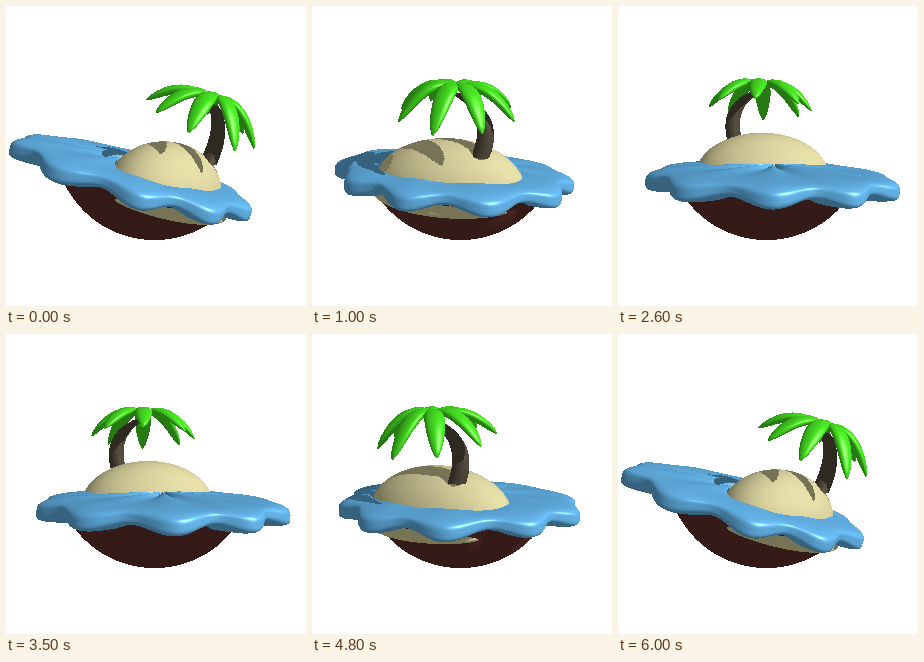
Animation of 300x300 px, one loop 6100 ms. Source, as an HTML page with a canvas:

```html
<!DOCTYPE html>
<html>
<head>
<meta charset="utf-8">
<style>
html, body { margin: 0; height: 100%; overflow: hidden; background: #fff; }
canvas { display: block; width: 300px; height: 300px; }
</style>
</head>
<body>
<canvas id="stage" width="300" height="300"></canvas>
<script>
const SIZE = 300, STEP = 100, LOOP = 6100, SWING = 6000, DISTANCE = 620;
const { PI, sin, cos, min, max, floor, ceil } = Math;
const rad = d => d * PI / 180;
const dot = (a, b) => a[0] * b[0] + a[1] * b[1] + a[2] * b[2];
const sub = (a, b) => a.map((x, i) => x - b[i]);
const cross = (a, b) => [a[1] * b[2] - a[2] * b[1], a[2] * b[0] - a[0] * b[2], a[0] * b[1] - a[1] * b[0]];
const unit = a => { const l = Math.hypot(...a) || 1; return a.map(x => x / l); };

const light = unit([.64, .47, .61]);
const lightX = unit(cross([0, 1, 0], light)), lightY = cross(light, lightX);
const halfway = unit([light[0], light[1], light[2] + 1]);

// A parametric surface sampled on a grid, with normals from differences.
function surface(cols, rows, color, gloss, f) {
  const verts = [], tris = [], e = 1e-3;
  for (let j = 0; j <= rows; j++) for (let i = 0; i <= cols; i++) {
    const u = i / cols, v = .005 + .99 * j / rows;
    const normal = unit(cross(sub(f(u + e, v), f(u - e, v)), sub(f(u, v + e), f(u, v - e))));
    verts.push({ point: f(u, v), normal });
    if (i < cols && j < rows) {
      const a = j * (cols + 1) + i, b = a + cols + 1;
      tris.push([a, a + 1, b], [a + 1, b + 1, b]);
    }
  }
  return { verts, tris, color, gloss };
}

// Starts at the pole of radius ry (negative for the top) and covers a share of the way to the other.
function ellipsoid([x, y, z], [rx, ry, rz], color, span = 1) {
  return surface(64, 28, color, 0, (u, v) => {
    const a = v * PI * span, t = u * 2 * PI;
    return [x + rx * sin(a) * cos(t), y - ry * cos(a), z + rz * sin(a) * sin(t)];
  });
}

const SAND = [229, 221, 167], BASE = [19, -6, 55], CROWN = [-7, 51, 54];

const water = surface(160, 24, [105, 188, 243], .35, (u, v) => {
  const t = u * 2 * PI, a = (v - .5) * PI, c = cos(a), lobe = cos(10 * t + .4 * sin(3 * t));
  const r = (117 + 6 * lobe + 3 * cos(3 * t + 1)) * (1 - (1 - c) ** 2);
  return [-5 + r * cos(t), -36 + (12 + 2 * lobe) * sin(a) - (2 + 3 * lobe) * c, -9 + r * sin(t)];
});

const trunk = surface(16, 14, [88, 80, 66], .25, (u, v) => {
  const a = u * 2 * PI, r = 8.5 - 2.5 * v, bend = 2 * v * (1 - v);
  return [BASE[0] + 14 * bend + (CROWN[0] - BASE[0]) * v * v + r * cos(a),
    BASE[1] + 40 * bend + (CROWN[1] - BASE[1]) * v * v,
    BASE[2] + r * sin(a)];
});

function leaf(degrees) {
  const c = cos(rad(degrees)), s = sin(rad(degrees)), front = cos(rad(degrees - 110));
  const length = 55 - 7 * front, droop = 26 + 12 * front;
  return surface(14, 16, [74, 232, 36], .4, (u, v) => {
    const a = u * 2 * PI, w = max(0, sin(PI * v ** 1.1)) ** .55;
    const side = 9 * w * cos(a), thick = 5 * w * sin(a);
    const out = length * v + thick * v;
    return [CROWN[0] + out * c - side * s,
      CROWN[1] + 4 + 24 * v - (droop + 24) * v * v + thick * (1 - v / 2),
      CROWN[2] + out * s + side * c];
  });
}

const parts = [
  ellipsoid([0, 0, 0], [99, 99, 99], [100, 52, 46], .363),
  ellipsoid([-8, -51, 24], [72, 12, 72], SAND),
  ellipsoid([-7, -40, 33], [72, -46, 47], SAND, .53),
  water, trunk,
  ...[15, 60, 110, 165, 205, 245, 290, 330].map(leaf)
];

function rotation(time) {
  const yaw = 116 * (.5 - cos(2 * PI * time / SWING));
  const pitch = rad(7.5 + 4 * cos(rad(1.5 * (yaw + 5))));
  const roll = rad(.00084 * (yaw - 90) ** 2 - 2.6);
  const cy = cos(rad(yaw)), sy = sin(rad(yaw)), cp = cos(pitch), sp = sin(pitch), cr = cos(roll), sr = sin(roll);
  return ([x, y, z]) => {
    const x1 = x * cy - z * sy, z1 = x * sy + z * cy, y1 = y * cp - z1 * sp;
    return [x1 * cr + y1 * sr, y1 * cr - x1 * sr, y * sp + z1 * cp];
  };
}

// Fills triangles into a depth buffer; put() gets each nearest pixel.
function raster(part, key, depth, put) {
  for (const tri of part.tris) {
    const [A, B, C] = tri.map(i => part.verts[i]);
    const a = A[key], b = B[key], c = C[key];
    const area = (b[0] - a[0]) * (c[1] - a[1]) - (c[0] - a[0]) * (b[1] - a[1]);
    if (!area) continue;
    const x0 = max(0, ceil(min(a[0], b[0], c[0]))), x1 = min(SIZE - 1, floor(max(a[0], b[0], c[0])));
    const y0 = max(0, ceil(min(a[1], b[1], c[1]))), y1 = min(SIZE - 1, floor(max(a[1], b[1], c[1])));
    for (let y = y0; y <= y1; y++) for (let x = x0; x <= x1; x++) {
      const q = ((x - a[0]) * (c[1] - a[1]) - (c[0] - a[0]) * (y - a[1])) / area;
      const r = ((b[0] - a[0]) * (y - a[1]) - (x - a[0]) * (b[1] - a[1])) / area;
      const p = 1 - q - r;
      if (p < -1e-6 || q < -1e-6 || r < -1e-6) continue;
      const z = p * a[2] + q * b[2] + r * c[2], i = y * SIZE + x;
      if (z <= depth[i]) continue;
      depth[i] = z;
      if (put) put(i, k => [0, 1, 2].map(n => p * A[k][n] + q * B[k][n] + r * C[k][n]));
    }
  }
}

const ctx = document.getElementById('stage').getContext('2d');
const image = ctx.createImageData(SIZE, SIZE);
const depth = new Float32Array(SIZE * SIZE), shadow = new Float32Array(SIZE * SIZE);

function draw(time) {
  const turn = rotation(time);
  depth.fill(-1e9);
  shadow.fill(-1e9);
  image.data.fill(255);
  for (const part of parts) {
    for (const v of part.verts) {
      const p = turn(v.point), s = DISTANCE / (DISTANCE - p[2]);
      v.facing = turn(v.normal);
      v.screen = [148 + p[0] * s, 165 - (p[1] + 31) * s, p[2]];
      v.lit = [dot(p, lightX) + 150, dot(p, lightY) + 150, dot(p, light)];
    }
    raster(part, 'lit', shadow);
  }
  for (const part of parts) raster(part, 'screen', depth, (i, mix) => {
    let n = unit(mix('facing'));
    if (n[2] < 0) n = n.map(x => -x);
    const [lx, ly, lz] = mix('lit');
    const clear = lz + 4 > shadow[Math.round(ly) * SIZE + Math.round(lx)];
    const diffuse = clear ? max(0, dot(n, light)) : 0;
    const shine = clear ? 255 * part.gloss * max(0, dot(n, halfway)) ** 40 : 0;
    part.color.forEach((c, k) => image.data[i * 4 + k] = c * (.52 + .5 * diffuse) + shine);
  });
  ctx.putImageData(image, 0, 0);
}

const start = performance.now();
let shown = -1;
function tick() {
  const time = floor((performance.now() - start) % LOOP / STEP) * STEP;
  if (time !== shown) draw(shown = time);
  requestAnimationFrame(tick);
}
tick();
</script>
</body>
</html>
```
